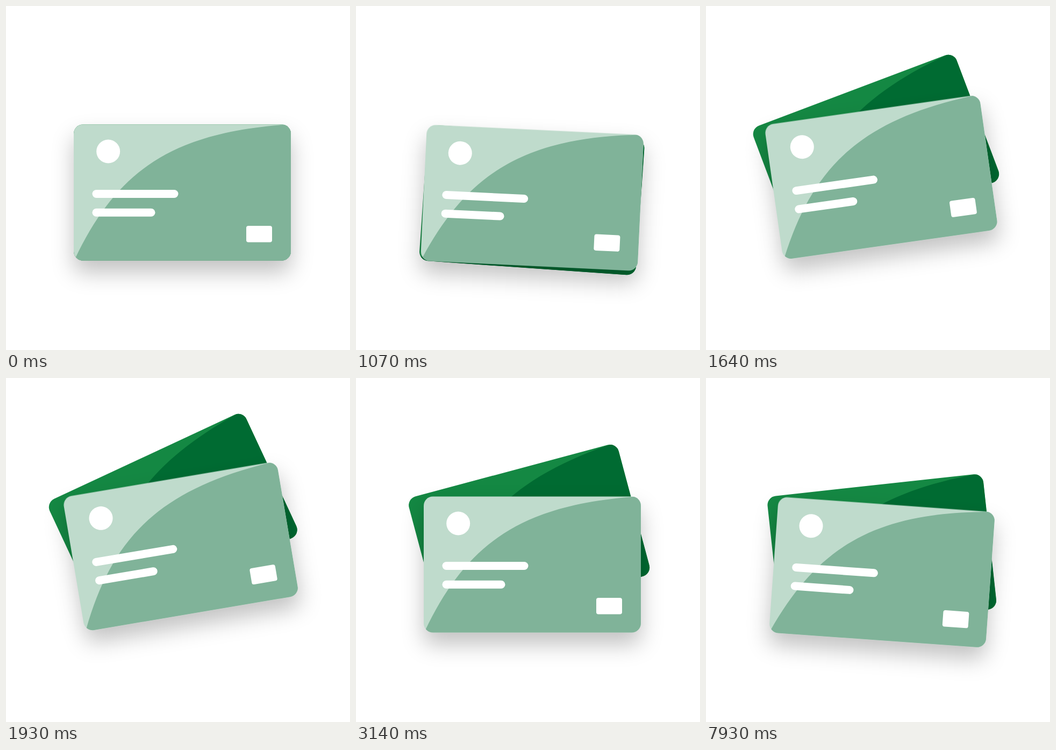
An HTML page for the animation above (8000 ms loop, 640 by 640 pixels).

```html
<!DOCTYPE html>
<html lang="en">
<head>
<meta charset="utf-8">
<title>Cards</title>
<style>
  html, body { margin: 0; width: 100%; height: 100%; overflow: hidden; background: #fff; }
  svg { display: block; width: 100%; height: 100%; }
  .shadow { filter: drop-shadow(0 22px 20px rgba(0, 0, 0, .24)); }
</style>
</head>
<body>
<svg viewBox="0 0 640 640">
  <defs>
    <rect id="base" x="126" y="220.5" width="404" height="253" rx="17"/>
    <clipPath id="clip"><use href="#base"/></clipPath>
    <path id="wave" clip-path="url(#clip)"
      d="M129 469C205 310 305 237 515 221L530 220V474H126Z"/>
  </defs>
  <g id="back">
    <use href="#base" fill="#148843"/>
    <use href="#wave" fill="#006b32"/>
  </g>
  <g id="front">
    <use href="#base" fill="#bfdbcc" class="shadow"/>
    <use href="#wave" fill="#80b399"/>
    <g fill="#fff">
      <circle cx="190.2" cy="270.5" r="22"/>
      <rect x="160.5" y="342" width="160" height="15" rx="7.5"/>
      <rect x="160.5" y="376.7" width="117" height="15" rx="7.5"/>
      <rect x="447" y="409" width="48" height="30.5" rx="4"/>
    </g>
  </g>
</svg>
<script>
const LOOP = 8000, FPS = 14;

// Swings as [start ms, end ms, change in degrees]
const frontSwings = [[0, 700, 5.2], [800, 1850, -14.8], [1950, 3140, 9.6], [7378, 8161, 5.2]];
const backSwings = [[0, 800, 7], [885, 1870, -32], [2040, 3140, 10], [7385, 8195, 11.75]];

const front = document.getElementById('front');
const back = document.getElementById('back');

function ease(u) {
  u = Math.min(1, Math.max(0, u));
  return u * u * (3 - 2 * u);
}

function angle(swings, t) {
  return swings.reduce((sum, [a, b, turn]) => sum + turn * ease((t - a) / (b - a)), 0);
}

function turn(card, degrees, pivotY) {
  card.setAttribute('transform', `rotate(${degrees.toFixed(3)} 126 ${pivotY})`);
}

const start = performance.now();

function draw() {
  const elapsed = (performance.now() - start) % LOOP;
  // The motion advances in even steps, FPS per second
  const t = Math.floor(elapsed * FPS / 1000 + .1) * 1000 / FPS % LOOP;
  turn(front, angle(frontSwings, t), 347);
  turn(back, angle(backSwings, t), 343);
  requestAnimationFrame(draw);
}
draw();
</script>
</body>
</html>
```
